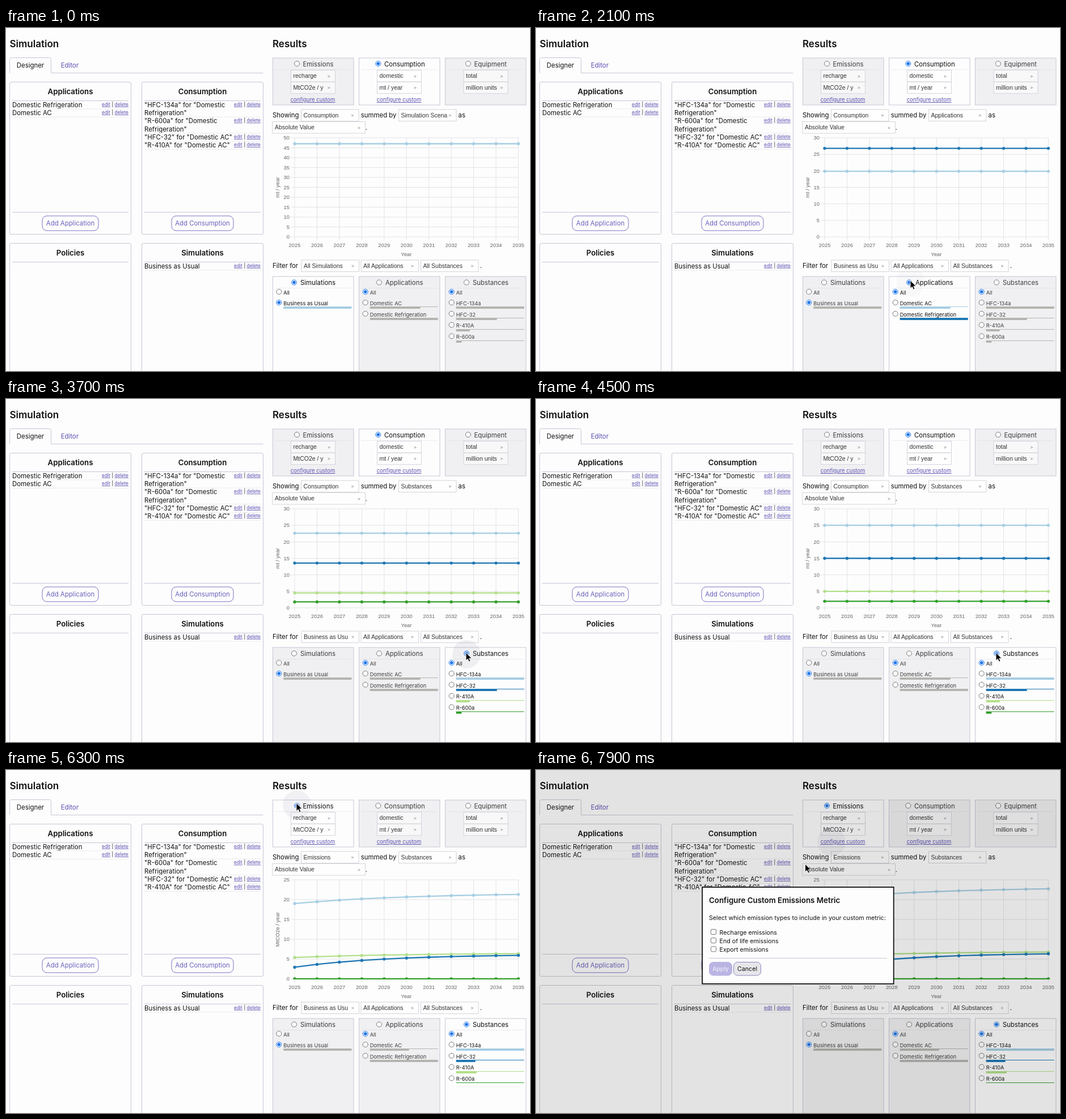
Animation, 924 px wide and 606 px high, one loop 8 s. Source, as an HTML page:

```html
<!DOCTYPE html>
<html lang="en">
<head>
<meta charset="utf-8">
<title>Simulation results</title>
<style>
html, body { margin: 0; width: 100%; height: 100%; overflow: hidden; background: #fdfdfd; }
svg { display: block; width: 924px; height: 606px; }
text { font-family: Inter, sans-serif; font-size: 11.4px; fill: #111; white-space: pre; }
.h1 { font-size: 17px; font-weight: 600; }
.h2 { font-size: 13.2px; font-weight: 600; }
.h3 { font-size: 13.35px; font-weight: 600; }
.link { fill: #5a50b0; }
.btn { fill: #6a62bc; }
.tiny { font-size: 8.4px; }
.small { font-size: 9.2px; }
.custom { font-size: 9.5px; }
.u { text-decoration: underline; }
.sel { font: 10.5px "Liberation Sans", Arial, sans-serif; fill: #333; }
.arrow { font: 8px "Liberation Mono", monospace; fill: #666; }
.axis { font: 9.4px "Liberation Sans", Arial, sans-serif; fill: #666; }
.dlg { font-size: 10.7px; }
.off { fill: #3c3c3c; }
</style>
</head>
<body>
<svg id="stage" viewBox="0 0 924 606">
  <clipPath id="plot"><rect x="500" y="188" width="410" height="182"/></clipPath>
  <rect width="924" height="606" fill="#fdfdfd"/>
  <g id="designer"></g>
  <g id="panels"></g>
  <g id="chart"></g>
  <g id="modal"></g>
  <circle id="ripple" r="25" fill="#303060"/>
  <path id="cursor" d="M0 0V14.2L3.3 11.2L5.5 16.2L8 15.1L5.8 10.2H10.2Z" fill="#000" stroke="#fff" stroke-width="1" stroke-linejoin="round"/>
</svg>
<script>
const $ = id => document.getElementById(id);
const BORDER = '#c6c6d6', FAINT = '#ececf0', PURPLE = '#7a72c4';
const COLORS = ['#a6cee3', '#1f78b4', '#b2df8a', '#33a02c'];
const LOOP = 8000;

const text = (x, y, s, cls = '', more = '') => `<text x="${x}" y="${y}" class="${cls}" ${more}>${s}</text>`;
const mid = (x, y, s, cls) => text(x, y, s, cls, 'text-anchor="middle"');
const line = (x1, y1, x2, y2, c = BORDER, w = 1) =>
  `<line x1="${x1}" y1="${y1}" x2="${x2}" y2="${y2}" stroke="${c}" stroke-width="${w}"/>`;
const rect = (x, y, w, h, fill = 'none', stroke = BORDER, r = 0) =>
  `<rect x="${x}" y="${y}" width="${w}" height="${h}" rx="${r}" fill="${fill}" stroke="${stroke}"/>`;
const bar = (x, y, w, h, c) => `<rect x="${x}" y="${y}" width="${w}" height="${h}" fill="${c}"/>`;

function radio(x, y, on) {
  return `<circle cx="${x}" cy="${y}" r="4.5" fill="#fff" stroke="${on ? '#1a73e8' : '#777'}"/>` +
    (on ? `<circle cx="${x}" cy="${y}" r="2.8" fill="#1a73e8"/>` : '');
}

function select(x, y, w, label, h = 20.5) {
  return rect(x + .5, y + .5, w, h, 'rgba(255,255,255,.55)', '#d4d4dc') +
    text(x + 4.5, y + 14.3, label, 'sel') + text(x + w - 13, y + 13.6, '&gt;', 'arrow');
}

// Left side: the designer
function editLinks(right, y) {
  return text(right - 47, y, 'edit', 'tiny link u') + text(right - 29.5, y, '|', 'tiny') +
    text(right, y, 'delete', 'tiny link u', 'text-anchor="end"');
}

function box(x, y, title, rows, button, width) {
  let s = rect(x + .5, y + .5, 214, button ? 269 : 260, '#fdfdfd', BORDER, 2.5);
  s += mid(x + 107.5, y + 21.8, title, 'h2') + line(x + 5, y + 33.5, x + 210, y + 33.5);
  let top = y + 33.5;
  for (const row of rows) {
    row.forEach((words, i) => s += text(x + 5, top + 11.2 + i * 14.2, words));
    s += editLinks(x + 210, top + 9.3);
    top += row.length * 14.2 + .2;
    s += line(x + 5, top, x + 210, top, FAINT);
  }
  if (button) {
    s += line(x + 5, y + 230.5, x + 210, y + 230.5);
    s += rect(x + 107.5 - width / 2, y + 237, width, 26, '#fdfdfd', PURPLE, 8);
    s += mid(x + 107.5, y + 254, button, 'btn');
  }
  return s;
}

$('designer').innerHTML =
  text(6.5, 33.6, 'Simulation', 'h1') + text(470, 33.6, 'Results', 'h1') +
  `<path d="M6.5 79.5V55.5Q6.5 52.5 9.5 52.5H76.5Q79.5 52.5 79.5 55.5V79.5H453.5" fill="none" stroke="${BORDER}"/>` +
  mid(43, 70, 'Designer') + mid(112.3, 70, 'Editor', 'link') +
  box(6, 95, 'Applications', [['Domestic Refrigeration'], ['Domestic AC']], 'Add Application', 99) +
  box(239, 95, 'Consumption', [
    ['"HFC-134a" for "Domestic', 'Refrigeration"'],
    ['"R-600a" for "Domestic', 'Refrigeration"'],
    ['"HFC-32" for "Domestic AC"'],
    ['"R-410A" for "Domestic AC"']], 'Add Consumption', 109) +
  box(6, 380, 'Policies', []) +
  box(239, 380, 'Simulations', [['Business as Usual']]);

// Right side: what each stage shows
const flat = v => () => v;
const settle = (end, gap, k) => i => end - gap * Math.exp(-k * i);
const consumption = { metric: 1, name: 'Consumption', unit: 'mt / year', ac: 20 / 27, parts: [1, .6, .2, .08] };
const emissions = { metric: 0, name: 'Emissions', unit: 'MtCO2e / year', ac: .575, parts: [1, .283, .302, 0] };
const leak = [settle(23.15, 2.88, .19), settle(6.6, 3.47, .25), settle(6.93, 1.17, .2), flat(0)];
const STAGES = [
  { at: -2000, ...consumption, dim: 0, by: 'Simulation Scena', max: 50, series: [flat(47)] },
  { at: 1390, ...consumption, dim: 1, by: 'Applications', max: 30, series: [flat(20), flat(27)] },
  { at: 3257, ...consumption, dim: 2, by: 'Substances', max: 30, series: [25, 15, 5, 2].map(flat) },
  { at: 5800, ...emissions, dim: 2, by: 'Substances', max: 25, series: leak }
];
const MODAL_AT = 7350;

function metricPanel(i, on, title, rx, tx, sx, options) {
  const x = 470 + i * 152;
  return rect(x + .5, 53, 142.5, 83, on ? '#fdfdfd' : '#f0f0f2') +
    line(x + 4, 73.5, x + 139, 73.5, on ? FAINT : '#e4e4ea') +
    radio(rx, 63, on) + text(tx, 67.8, title, on ? '' : 'off') +
    options.map((o, j) => select(sx, 74 + j * 20.7, 78, o)).join('') +
    (i < 2 ? mid(x + 71, 130, 'configure custom', 'custom link u') : '');
}

function filterPanel(i, on, title, rx, picked, rows) {
  const x = 470 + i * 152, tx = [489.3, 641.7, 793.7][i], cls = on ? 'small' : 'small off';
  let s = rect(x + .5, 439, 142.5, 190, on ? '#fdfdfd' : '#f0f0f2') +
    line(x + 4, 459.5, x + 139, 459.5, on ? FAINT : '#e4e4ea') +
    radio(rx, 449.5, on) + text(rx + 11, 454.4, title, on ? '' : 'off') +
    radio(tx - 8, 466, picked === 0) + text(tx, 470.8, 'All', cls);
  rows.forEach(([name, part], j) => {
    const y = 485 + j * 19.8, top = Math.round(y + 7.3), c = on ? COLORS[j] : '#b4b4b0';
    s += radio(tx - 8, y, picked === j + 1) + text(tx, y + 4.8, name, cls) +
      bar(tx, top, 120, 1, c) + bar(tx, top, 120 * part, 4, c);
  });
  return s;
}

function panels(st) {
  const m = st.metric, d = st.dim, p = st.parts;
  return metricPanel(0, m === 0, 'Emissions', 513, 523.5, 502, ['recharge', 'MtCO2e / y']) +
    metricPanel(1, m === 1, 'Consumption', 656.3, 667, 654, ['domestic', 'mt / year']) +
    metricPanel(2, false, 'Equipment', 815, 825.5, 806.5, ['total', 'million units']) +
    text(470, 158, 'Showing') + select(520, 143.5, 101.5, st.name) +
    text(625.8, 158, 'summed by') + select(692, 143.5, 101.5, st.by) + text(797.5, 158, 'as') +
    select(469.5, 165, 163.5, 'Absolute Value') + text(633.7, 179.5, '.') +
    text(470, 424, 'Filter for') + select(520.5, 409.5, 101.5, d ? 'Business as Usu' : 'All Simulations') +
    select(625.5, 409.5, 101.5, 'All Applications') + select(731, 409.5, 101.5, 'All Substances') +
    text(835.8, 424, '.') +
    filterPanel(0, d === 0, 'Simulations', 508, 1, [['Business as Usual', 1]]) +
    filterPanel(1, d === 1, 'Applications', 658, 0, [['Domestic AC', st.ac], ['Domestic Refrigeration', 1]]) +
    filterPanel(2, d === 2, 'Substances', 812, 0,
      ['HFC-134a', 'HFC-32', 'R-410A', 'R-600a'].map((n, j) => [n, p[j]]));
}

const px = i => 509 + i * 39.45;

function chart(st, t) {
  const py = v => 369 - v * 175 / st.max;
  const rest = 1 - Math.min(1, (t - st.at) / 1000), grow = 1 - rest ** 4;
  let s = '';
  for (let i = 0; i <= 10; i++)
    s += line(px(i), 194, px(i), 375, '#e3e3e8') + mid(px(i), 386.6, 2025 + i, 'axis');
  for (let v = 0; v <= st.max; v += 5)
    s += line(503, py(v), 904, py(v), '#e3e3e8') + text(500, py(v) + 3.2, v, 'axis', 'text-anchor="end"');
  s += mid(706, 403, 'Year', 'axis') +
    text(0, 0, st.unit, 'axis', 'text-anchor="middle" transform="translate(481.5 281.7) rotate(-90)"');
  s += '<g clip-path="url(#plot)">';
  for (let n = st.series.length - 1; n >= 0; n--) {
    const c = COLORS[n];
    let pts = '', dots = '';
    for (let i = 0; i <= 10; i++) {
      const y = py(st.series[n](i) * grow).toFixed(2);
      pts += `${px(i)},${y} `;
      dots += `<circle cx="${px(i)}" cy="${y}" r="2.7" fill="${c}"/>`;
    }
    s += `<polyline points="${pts}" fill="none" stroke="${c}" stroke-width="2.3"/>` + dots;
  }
  return s + '</g>';
}

$('modal').innerHTML =
  '<rect width="924" height="606" fill="rgba(0,0,0,.1)"/>' +
  '<rect x="293.2" y="207" width="337.5" height="170.8" fill="#fdfdfd" stroke="#111" stroke-width="1.8"/>' +
  text(305, 235.2, 'Configure Custom Emissions Metric', 'h3') +
  text(305, 265.2, 'Select which emission types to include in your custom metric:', 'dlg') +
  ['Recharge emissions', 'End of life emissions', 'Export emissions'].map((s, i) =>
    rect(308.5, 281.5 + i * 15.2, 9, 9, '#fff', '#777', 1.5) + text(323.5, 291 + i * 15.2, s, 'dlg')).join('') +
  line(305, 332.5, 619, 332.5) +
  rect(305.5, 339.5, 40, 23.5, '#b9b4e2', '#b9b4e2', 7) +
  text(325.5, 355.2, 'Apply', 'dlg', 'text-anchor="middle" style="fill:#f4f3fc"') +
  rect(348.5, 339.5, 48, 23.5, '#e6e6ea', '#8a84c0', 7) + mid(372.5, 355.2, 'Cancel', 'dlg');

// Pointer: start time, end time, destination
const START = [700, 640];
const MOVES = [
  [500, 1200, 660, 446], [2500, 3150, 811, 448], [4900, 5650, 512, 58.5],
  [6700, 7200, 520, 124], [7500, 7900, 474.5, 166]
];
const CLICKS = [[1390, 660, 446], [3257, 811, 448], [5800, 512, 58.5], [MODAL_AT, 520, 124]];
const ease = p => p < .5 ? 4 * p ** 3 : 1 - (2 - 2 * p) ** 3 / 2;

function pointer(t) {
  let [x, y] = START;
  for (const [a, b, tx, ty] of MOVES) {
    const k = ease(Math.max(0, Math.min(1, (t - a) / (b - a))));
    x += (tx - x) * k;
    y += (ty - y) * k;
  }
  return [x, y];
}

let shown = null;
function render(t) {
  const st = STAGES.filter(s => s.at <= t).pop();
  if (st !== shown) $('panels').innerHTML = panels(shown = st);
  $('chart').innerHTML = chart(st, t);
  $('modal').style.display = t >= MODAL_AT ? '' : 'none';

  const [x, y] = pointer(t);
  $('cursor').setAttribute('transform', `translate(${x.toFixed(2)} ${y.toFixed(2)})`);

  const hit = CLICKS.find(c => t >= c[0] && t < c[0] + 850);
  const ring = $('ripple');
  ring.setAttribute('opacity', hit ? .14 * (1 - (t - hit[0]) / 850) : 0);
  if (hit) {
    ring.setAttribute('cx', hit[1] + 1);
    ring.setAttribute('cy', hit[2] + 3);
  }
}

const begin = performance.now();
function tick() {
  render((performance.now() - begin) % LOOP);
  requestAnimationFrame(tick);
}
tick();
</script>
</body>
</html>
```
